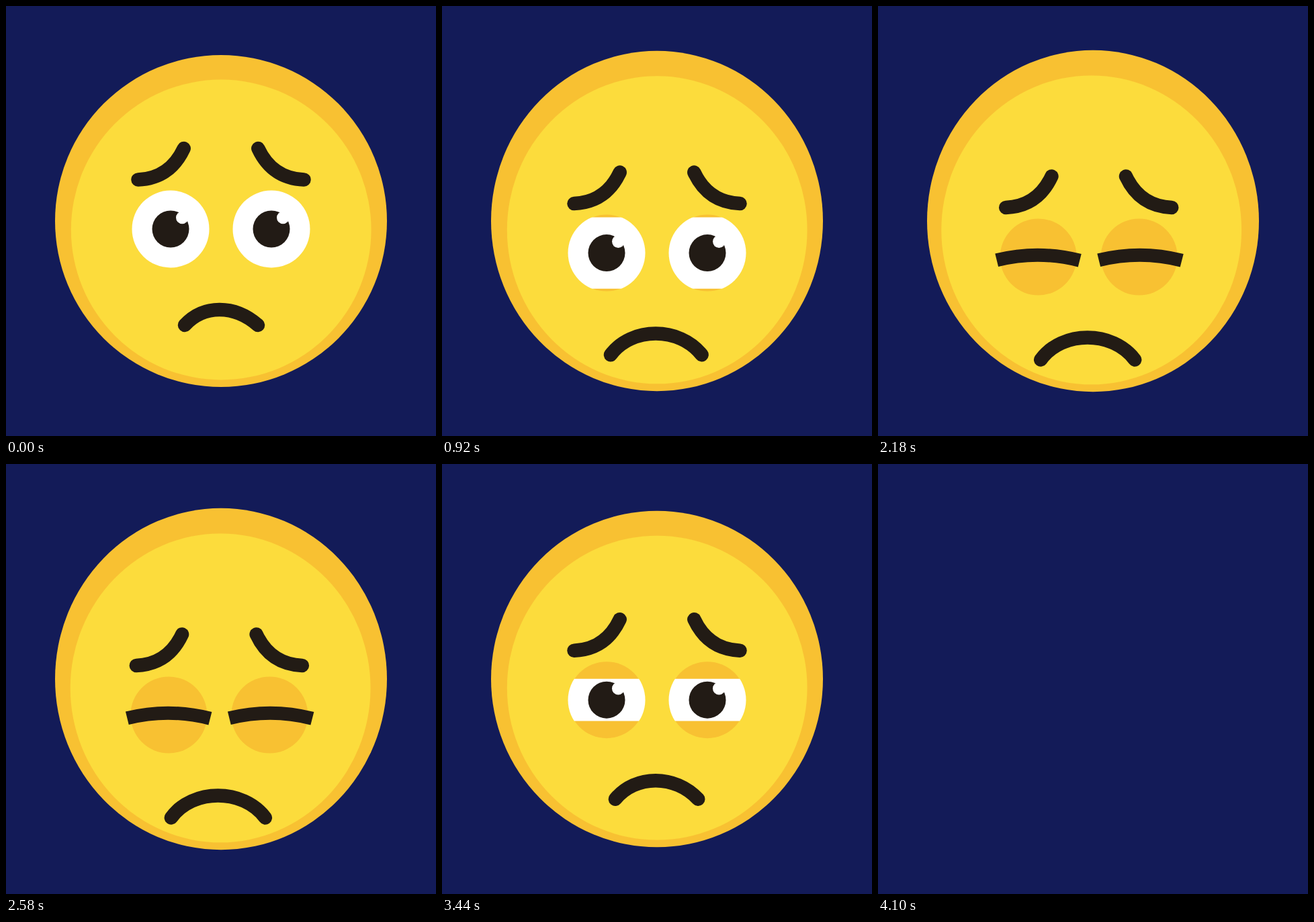
An HTML page for the animation above (4.12 s loop, 640 by 640 pixels).

```html
<!DOCTYPE html>
<html>
<head>
<meta charset="utf-8">
<style>
html, body { margin: 0; width: 100%; height: 100%; overflow: hidden; background: #131b58; }
svg { display: block; width: 100vw; height: 100vh; }
.line { fill: none; stroke: #221b15; stroke-width: 20.5; stroke-linecap: round; }
.lash { stroke-width: 20; stroke-linecap: butt; }
</style>
</head>
<body>
<svg viewBox="0 0 640 640">
  <defs>
    <clipPath id="gap"><rect id="slit" x="-60" width="120"/></clipPath>
    <g id="eye">
      <circle r="57" fill="#f8c132"/>
      <g clip-path="url(#gap)">
        <circle r="57.5" fill="#fff"/>
        <circle r="27.5" fill="#221b15"/>
        <circle cx="17.3" cy="-17" r="9.3" fill="#fff"/>
      </g>
    </g>
    <path id="brow" class="line" d="M196.5 258.5Q244 256.5 264.7 212"/>
    <path id="lash" class="line lash" d="M-62 4.8Q0 -10.5 61.5 5.3"/>
  </defs>
  <g id="head">
    <g id="skin">
      <circle cx="320" cy="320" r="247" fill="#f8c132"/>
      <circle id="front" cy="333" r="223.4" fill="#fcdc3c"/>
    </g>
    <g id="features">
      <use href="#brow"/>
      <use href="#brow" transform="matrix(-1 0 0 1 640 0)"/>
      <use href="#eye" x="245" y="332"/>
      <use href="#eye" x="395" y="332"/>
      <g id="lashes">
        <use href="#lash" x="245" y="332"/>
        <use href="#lash" x="397" y="332"/>
      </g>
    </g>
    <path id="mouth" class="line"/>
  </g>
</svg>
<script>
const LOOP = 4120, BLANK = 4100;
const SHAKE_START = 1120, SHAKE_STEP = 395, SHAKE = [0, -12, 12, -12, 0];
const el = id => document.getElementById(id);
const set = (id, attrs) => {
  for (const name in attrs) el(id).setAttribute(name, attrs[name]);
};
const mix = (a, b, k) => a + (b - a) * k;
const ease = (t, from, to) => {
  const k = Math.min(1, Math.max(0, (t - from) / (to - from)));
  return k * k * (3 - 2 * k);
};

// Sideways offset of the face, eased between the shake poses
function shakeAt(t) {
  return SHAKE.slice(1).reduce((x, pose, i) => {
    const from = SHAKE_START + i * SHAKE_STEP;
    return x + (pose - SHAKE[i]) * ease(t, from, from + SHAKE_STEP);
  }, 0);
}

function draw(t) {
  const sad = ease(t, 20, 1200) - ease(t, 2820, 4000);
  const open = 1 - ease(t, 834, 1314) + ease(t, 3187, 3667);
  const dx = shakeAt(t), dy = 41.5 * sad;
  const half = 58 * open;

  set('head', { visibility: t >= BLANK ? 'hidden' : 'visible' });
  set('skin', { transform: `translate(0 320) scale(1 ${1 + 0.0293 * sad}) translate(0 -320)` });
  set('front', { cx: 320.2 + dx * 0.4 });
  set('features', { transform: `translate(${dx} ${dy})` });
  set('slit', { y: -half, height: 2 * half });
  set('lashes', { display: half < 8 ? 'inline' : 'none' });

  const left = mix(266, 248.5, sad), right = mix(375, 388.5, sad);
  const end = mix(475, 526.5, sad), peak = mix(444.3, 482.5, sad);
  set('mouth', {
    transform: `translate(${dx} 0)`,
    d: `M${left} ${end}C${mix(294, 280, sad)} ${peak} ${mix(340, 356, sad)} ${peak} ${right} ${end}`
  });
}

const start = performance.now();
function tick() {
  const t = (performance.now() - start) % LOOP;
  draw(Math.floor(t / 20) * 20);
  requestAnimationFrame(tick);
}
tick();
</script>
</body>
</html>
```
